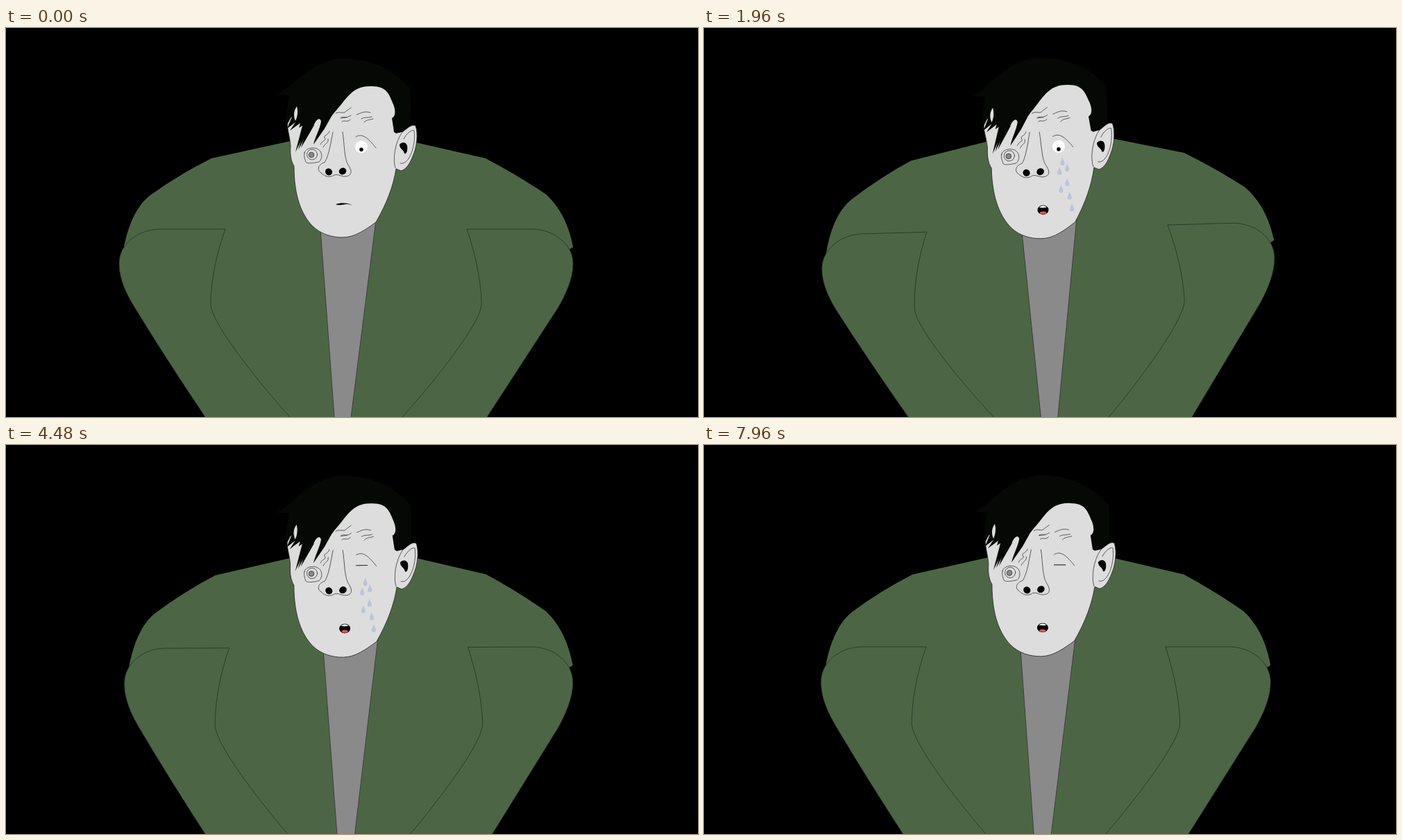
These frames come from a looping animation (997x561 px, 8 s). An HTML page:

```html
<!DOCTYPE html>
<html lang="en">
<head>
<meta charset="utf-8">
<title>Weeping man</title>
<style>
  html, body { margin: 0; width: 100%; height: 100%; overflow: hidden; background: #000; }
  svg { display: block; width: 100%; height: 100%; }
  .line { fill: none; stroke: #3a3a3a; stroke-width: .8; stroke-linecap: round; }
  .coat { fill: #4c6645; stroke: #263323; stroke-width: .8; }
  .skin { fill: #ddd; stroke: #222; stroke-width: .8; }
  .hair { fill: #060805; }
</style>
</head>
<body>
<svg viewBox="0 0 997 561">
  <rect width="997" height="561" fill="#000"/>

  <g id="body">
    <path fill="#4c6645" d="M410,163 L296,188 Q248,212 208,241 C187,257 176,286 170,315 L230,420 L340,620 H640 L760,420 L812,319 L817,316
      C812,290 802,262 778,240 Q740,214 691,188 L590,165 Z"/>
    <path fill="#8a8a8a" stroke="#333" stroke-width=".8" d="M450,250 L453,290 L476,601 H492 L533,277 L536,250 Z"/>
    <path class="coat" d="M316,290 L222,290 C195,290 163,308 163,340 C163,362 173,383 186,404 Q230,476 287,561 L314,601
      H445 L409,561 C350,495 295,422 295,398 C295,365 303,325 316,290 Z"/>
    <path class="coat" d="M664,290 L759,290 C790,291 817,312 817,340 C817,362 806,385 795,404 L693,561 L667,601
      H535 L571,561 C630,495 685,422 685,398 C685,372 678,330 664,290 Z"/>
  </g>

  <g id="head">
    <path class="skin" d="M406,137 C404,142 409,156 410,170 C409,183 411,193 415,199 C415,245 427,270 441,285
      C453,297 469,302 485,302 C503,302 519,290 533,280 C549,252 558,228 562,203 L569,206 C577,204 582,195 586,185
      C592,172 594,152 590,141 C584,138 577,146 571,150 L570,110 L530,70 L440,80 L420,110 Z"/>
    <path class="hair" d="M391,96 L408,84 C440,54 465,44 487,44 C525,45 554,59 570,75 L582,86
      C584,108 583,128 582,141 L571,150 L562,152 L559,150 L556,130 C562,127 561,118 558,110 C552,96 549,84 527,84
      C506,83 497,93 487,105 C478,117 472,122 468,129 L459,145 L443,168 C445,158 452,146 454,135
      C453,129 449,131 446,135 L437,152 L431,138 L422,144 L424,137 L409,148 L417,136 L405,145 L412,128 L402,137 L408,97 Z"/>
    <g id="fringe" class="hair"></g>
    <path fill="#ddd" d="M419,113 C414,120 414,127 417,134 C420,128 421,120 419,113 Z"/>

    <!-- ear -->
    <path class="line" d="M571,150 C560,165 557,190 561,202 M573,160 C577,152 585,146 588,148 C591,171 580,199 568,195"/>
    <path d="M567,168 C570,164 577,164 578,170 C579,176 577,183 574,181 C573,175 567,175 567,168 Z"/>

    <!-- forehead and frown -->
    <path class="line" d="M475,123 C482,119 486,125 490,120 L497,115 M483,129 C488,127 490,131 497,126 M482,130 L491,129
      M484,135 C488,132 491,137 496,132 M505,125 C511,123 516,119 525,122 M512,131 C516,128 520,130 527,128
      M516,136 C519,132 523,133 529,131"/>
    <path class="line" d="M453,168 C457,160 462,164 459,158 C457,155 464,155 466,149 M457,172 C460,165 465,167 464,160"/>

    <!-- nose -->
    <path class="line" d="M471,150 C468,165 465,185 459,194 C450,196 447,205 454,209 C460,215 467,216 473,212
      C478,210 484,215 490,214 C498,213 499,207 494,199 C487,190 488,170 485,150"/>
    <ellipse cx="465" cy="207.5" rx="5.2" ry="4.8" transform="rotate(35 465 207.5)"/>
    <ellipse cx="485" cy="206.5" rx="5.4" ry="4.8" transform="rotate(-25 485 206.5)"/>

    <!-- eyes -->
    <path class="line" d="M430,180 C432,172 447,170 453,178 C456,183 455,190 451,193 C444,195 432,196 432,193 C430,188 429,184 430,180 Z"/>
    <circle class="line" cx="441" cy="182.5" r="7.5"/>
    <circle cx="440" cy="183" r="3.8" fill="#888" stroke="#333" stroke-width=".8"/>
    <path class="line" d="M504,157 C512,152 520,156 533,173"/>
    <g id="eyeOpen">
      <circle cx="512" cy="171.5" r="9" fill="#fff"/>
      <circle cx="512" cy="175.3" r="2.8"/>
    </g>
    <path id="eyeShut" d="M503.5,171.8 H520.5" stroke="#333" stroke-width="1.1"/>

    <!-- mouth -->
    <path id="mouthShut" d="M475,254.5 C482,251.5 493,252 499,255.5 C492,253.6 489,254 487,254.6 C483,255.6 478,255.6 475,254.5 Z"/>
    <g id="mouthOpen">
      <ellipse cx="487.5" cy="261.2" rx="8" ry="6.7"/>
      <path fill="#fff" d="M482,257.5 Q487.5,253 493,257.5 Q487.5,258.5 482,257.5 Z"/>
      <ellipse cx="487.5" cy="265.3" rx="4.6" ry="2" fill="#e0574c"/>
    </g>
    <g id="tears" fill="#b9c5d9"></g>
  </g>
</svg>
<script>
const LOOP = 8000, STEP = 40, TEAR_CYCLE = 2400;
const byId = id => document.getElementById(id);

function addPath(parent, d) {
  const node = document.createElementNS('http://www.w3.org/2000/svg', 'path');
  node.setAttribute('d', d);
  byId(parent).append(node);
  return node;
}

// Thin strands fanning down over the left temple
for (let i = 0; i < 3; i++) {
  const x = 428 + 4 * i;
  addPath('fringe', `M${x},137 L${417 + 4 * i},${179 - 3 * i} L${x + 8},140 Z`);
}

// Three tears gather under the eye, the rest run down the cheek later
const tears = [[517, 188], [523.5, 197], [512.5, 201.5], [523, 218], [514, 227], [526, 237], [529, 254]]
  .map(([x, y], i) => ({
    x, y,
    start: 820 + 100 * i + (i > 2 ? 480 : 0),
    node: addPath('tears', 'M0,-6 C1,-2 3,0 3,2.5 A3,3 0 0 1 -3,2.5 C-3,0 -1,-2 0,-6 Z')
  }));

const clamp = v => Math.min(1, Math.max(0, v));
const ramp = (t, from, to) => {
  const u = clamp((t - from) / (to - from));
  return u * u * (3 - 2 * u);
};
const bump = (t, center, width) => Math.exp(-(((t - center) / width) ** 2));

// Affine change around a pivot
function warp(id, cx, cy, { tx, ty, sx, sy, shx, shy }) {
  const e = tx - sx * cx - shx * cy, f = ty - shy * cx - sy * cy;
  byId(id).setAttribute('transform', `matrix(${[1 + sx, shy, shx, 1 + sy, e, f]})`);
}

const show = (node, on) => node.setAttribute('visibility', on ? 'visible' : 'hidden');

function draw(ms) {
  const t = Math.floor(ms % LOOP / STEP) * STEP;

  const sag = ramp(t, 0, 2400) - .2 * ramp(t, 6400, LOOP);
  const tilt = ramp(t, 1740, 1960) * (1 - ramp(t, 2600, 5000));
  const heave = bump(t, 1650, 500);
  const sob = bump(t, 1800, 200);

  warp('body', 495, 188, {
    tx: 3 * sag - 2.6 * sob,
    ty: -.7 * sag - 4 * sag * (1 - sag) - 1.9 * heave,
    sx: -.012 * sag + .015 * sob,
    sy: .028 * sag - .025 * sob,
    shx: .03 * tilt,
    shy: -.029 * tilt
  });
  warp('head', 485, 180, {
    tx: .5 * sag - 1.5 * tilt,
    ty: 2 * sag * sag + 1.5 * tilt - 1.7 * heave - 3 * sob,
    sx: .008 * sag - .006 * sob,
    sy: .016 * sag - .008 * sob,
    shx: .025 * tilt,
    shy: -.028 * tilt - .005 * sag
  });

  const eyeOpen = t < 2600, mouthOpen = t >= 880;
  show(byId('eyeOpen'), eyeOpen);
  show(byId('eyeShut'), !eyeOpen);
  show(byId('mouthOpen'), mouthOpen);
  show(byId('mouthShut'), !mouthOpen);

  const phase = t % TEAR_CYCLE;
  const slide = 9 * clamp((phase - 1700) / 470);
  for (const { node, x, y, start } of tears) {
    show(node, phase >= start);
    node.setAttribute('transform', `translate(${x} ${y + slide})`);
  }
}

const begin = performance.now();
function tick() {
  draw(performance.now() - begin);
  requestAnimationFrame(tick);
}
tick();
</script>
</body>
</html>
```
